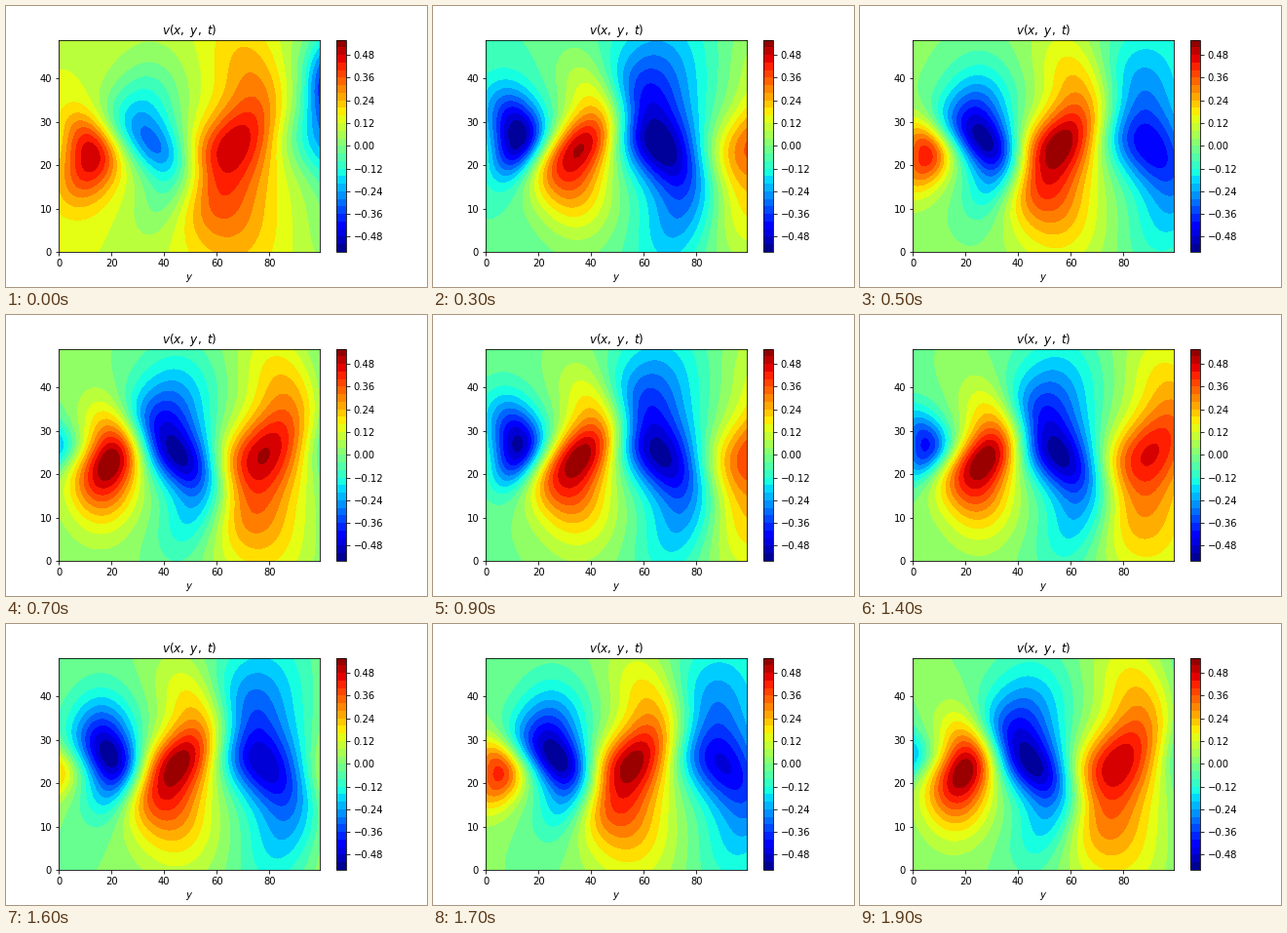
Write a matplotlib script that moves like this. It is 432 px wide and 288 px high and loops after 2 s.

```python
import numpy as np
import matplotlib.pyplot as plt
from matplotlib.animation import FuncAnimation

FRAMES, STEP = 20, 100
HALF_PERIOD = 3
MID = 24.5
PEAK = 0.56
Y, X = np.meshgrid(np.arange(100.0), np.arange(50.0))

BAR_LEVELS = np.linspace(-PEAK, PEAK, 29)
LEVELS = np.linspace(-PEAK, PEAK, 21)


def vortex(age, sign):
    """One drifting cell; neighbours are mirrored about the middle row."""
    amp = 0.6 / (1 + np.exp(-1.2 * (age + 1.7))) * np.exp(-(age / 12) ** 4)
    height = np.clip(7.2 + 1.4 * age, 5, 16)
    tilt = 9 * np.tanh(max(age, 0) / 4)
    lag = 6 * np.exp(-max(age, 0) / 4)

    u = sign * (X - MID) + np.clip(2 - age, -1.5, 2)
    bend = u / (0.75 * height)
    ridge = 12.5 + 7.6 * age + 0.29 * age ** 2
    ridge = ridge + tilt * bend * np.exp((1 - bend ** 2) / 2)
    ridge = ridge - lag * (1 - np.exp(-(u / height) ** 2 / 2))

    skew = np.tanh(u / 10)
    width = (7.5 + 0.8 * age) * (1 - 0.12 * skew)
    height = height * (1 - 0.08 * skew)
    return sign * amp * np.exp(-((Y - ridge) / width) ** 2 / 2
                               - (u / height) ** 2 / 2)


def field(t):
    newest = (t + 3) // HALF_PERIOD
    v = sum(vortex(t - HALF_PERIOD * n, (-1) ** (n % 2))
            for n in range(newest - 5, newest + 1))
    # The flow starts weaker, with a strong patch at the outlet.
    start = np.exp(-2 * t)
    patch = np.exp(-((Y - 102) / 8) ** 2 - ((X - 39) / 11) ** 2)
    v = v * (1 - 0.26 * start) - 0.34 * start * patch
    v = v + 0.11 * np.exp(-t / 4) * np.cos(np.pi * t / HALF_PERIOD)
    return np.clip(v, -0.999 * PEAK, 0.999 * PEAK)


fig, ax = plt.subplots(figsize=(6, 4), dpi=72)
fig.subplots_adjust(bottom=0.125)
bar = ax.contourf(field(0), BAR_LEVELS, cmap="jet")
fig.colorbar(bar, ax=ax)
bar.remove()
ax.set_title(r"$v(x,\ y,\ t)$")
ax.set_xlabel(r"$y$")
shown = []


def draw(t):
    while shown:
        shown.pop().remove()
    shown.append(ax.contourf(field(t), LEVELS, cmap="jet"))
    return shown


anim = FuncAnimation(fig, draw, frames=FRAMES, init_func=lambda: draw(0),
                     interval=STEP, repeat=True, repeat_delay=0)
plt.show()
```
